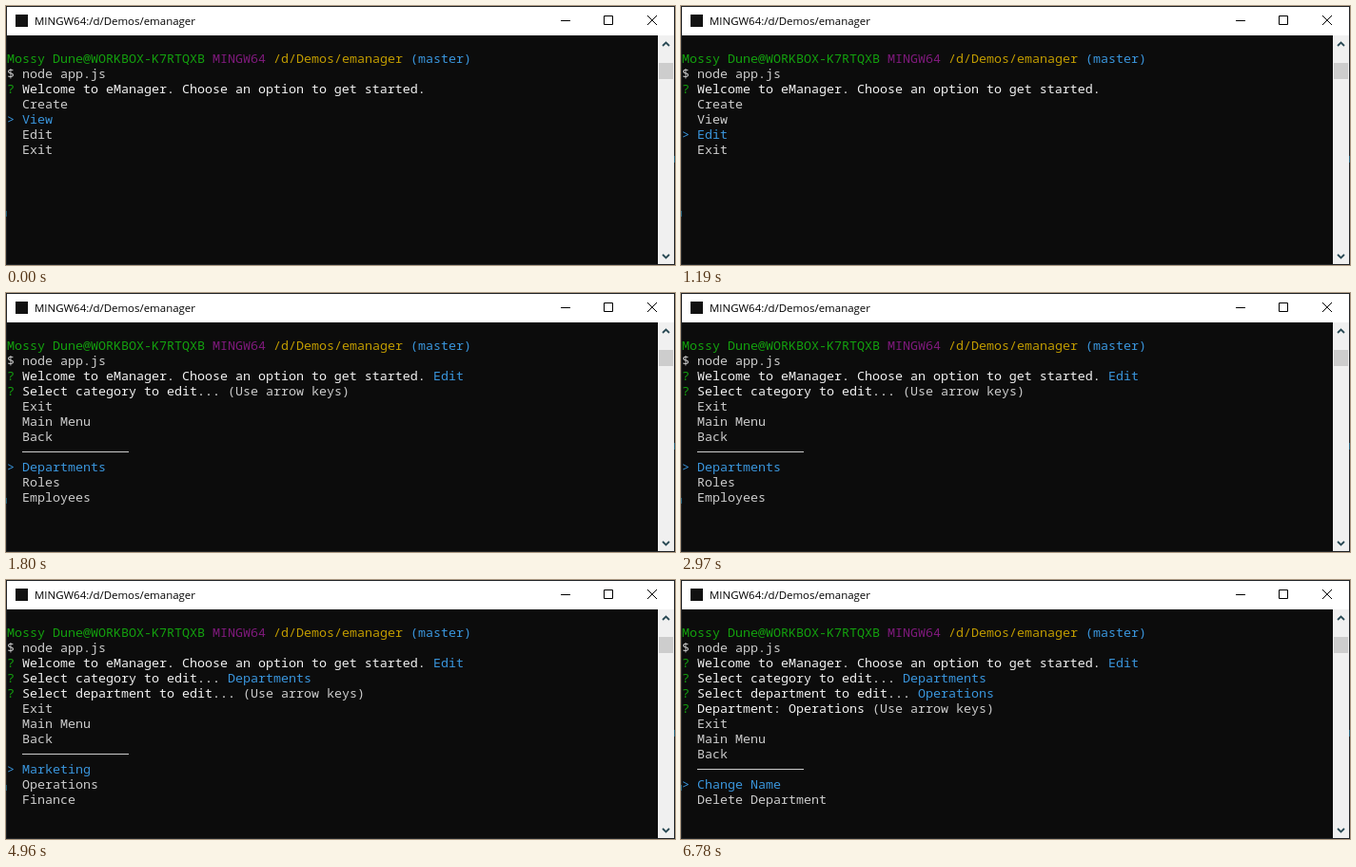
An HTML page for the animation above (8 s loop, 703 px wide and 273 px high).

```html
<!DOCTYPE html>
<html lang="en">
<head>
<meta charset="utf-8">
<title>Terminal menu</title>
<style>
  html, body { margin: 0; width: 100%; height: 100%; overflow: hidden; background: #0c0c0c; }
  svg { display: block; width: 703px; height: 273px; }
  .term text { font: 13.3333px "Noto Sans Mono", "DejaVu Sans Mono", monospace; white-space: pre; }
  .title { font: 11.46px "Open Sans", "Noto Sans", sans-serif; }
</style>
</head>
<body>
<svg viewBox="0 0 703 273" xmlns="http://www.w3.org/2000/svg">
  <rect width="703" height="273" fill="#202326"/>
  <rect x="1" y="1" width="701" height="30" fill="#fff"/>
  <rect x="1" y="31" width="684" height="241" fill="#0c0c0c"/>

  <rect x="10" y="9" width="13" height="13" fill="#111"/>
  <text class="title" x="30" y="20">MINGW64:/d/Demos/emanager</text>
  <g fill="none" stroke="#000">
    <path d="M583 15.5h10M628.5 10.5h9v9h-9z"/>
    <path d="M674 10l10 10M684 10l-10 10"/>
  </g>

  <rect x="685" y="31" width="17" height="241" fill="#f0f0f0"/>
  <rect x="686" y="60" width="15" height="17" fill="#cdcdcd"/>
  <path d="M690 42l3.5-3.5 3.5 3.5M690 262l3.5 3.5 3.5-3.5" fill="none" stroke="#2a4a55" stroke-width="1.8"/>

  <path d="M.5 216v6M702.5 158v7" stroke="#24627c"/>
  <g class="term" id="prompt"></g>
  <g class="term" id="screen"></g>
</svg>
<script>
const SVG = "http://www.w3.org/2000/svg";
const CELL = 8, LINE = 16, LEFT = 1, BASELINE = 60;
const LOOP = 8000;
const C = {
  green: "#13a10e", purple: "#7f1a7c", yellow: "#c19c00",
  blue: "#3a96dd", gray: "#cccccc", white: "#f2f2f2"
};

function add(parent, tag, attrs, content = "") {
  const el = document.createElementNS(SVG, tag);
  for (const key in attrs) el.setAttribute(key, attrs[key]);
  el.textContent = content;
  parent.appendChild(el);
}

// Writes [text, colour] pieces one after another on a terminal row.
function write(parent, row, ...pieces) {
  let column = 0;
  for (const [text, fill] of pieces) {
    add(parent, "text", { x: LEFT + column * CELL, y: BASELINE + row * LINE, fill }, text);
    column += text.length + 1;
  }
}

const WELCOME = "Welcome to eManager. Choose an option to get started.";
const CATEGORY = "Select category to edit...";
const DEPARTMENT = "Select department to edit...";
const HINT = "(Use arrow keys)";
const RULE = "-";

const answered = (question, answer) => [question, answer, C.blue];
const asking = (question, hint = "") => [question, hint, C.gray];

const main = ["Create", "View", "Edit", "Exit"];
const nav = ["Exit", "Main Menu", "Back", RULE];
const categories = [...nav, "Departments", "Roles", "Employees"];
const departments = [...nav, "Marketing", "Operations", "Finance"];
const actions = [...nav, "Change Name", "Delete Department"];

const editing = answered(WELCOME, "Edit");
const inDepartments = [editing, answered(CATEGORY, "Departments")];

const scenes = [
  { at: 0, questions: [asking(WELCOME)], menu: main, selected: "View" },
  { at: 400, questions: [asking(WELCOME)], menu: main, selected: "Edit" },
  { at: 1720, questions: [editing], menu: [], cursor: true },
  { at: 1800, questions: [editing, asking(CATEGORY, HINT)], menu: categories, selected: "Departments" },
  { at: 3750, questions: [...inDepartments, asking(DEPARTMENT, HINT)], menu: departments, selected: "Marketing" },
  { at: 5770, questions: [...inDepartments, asking(DEPARTMENT)], menu: departments, selected: "Operations" },
  { at: 6780,
    questions: [...inDepartments, answered(DEPARTMENT, "Operations"), asking("Department: Operations", HINT)],
    menu: actions, selected: "Change Name" }
];

const promptGroup = document.getElementById("prompt");
const screenGroup = document.getElementById("screen");

write(promptGroup, 0,
  ["Mossy Dune@WORKBOX-K7RTQXB", C.green], ["MINGW64", C.purple],
  ["/d/Demos/emanager", C.yellow], ["(master)", C.blue]);
write(promptGroup, 1, ["$ node app.js", C.gray]);

function draw({ questions, menu, selected, cursor }) {
  screenGroup.replaceChildren();
  let row = 2;
  for (const [question, tail, tailColor] of questions) {
    write(screenGroup, row++, ["?", C.green], [question, C.white], [tail, tailColor]);
  }
  for (const item of menu) {
    const active = item === selected;
    if (item === RULE) {
      add(screenGroup, "rect", {
        x: LEFT + 2 * CELL, y: BASELINE + row * LINE - 5,
        width: 14 * CELL, height: 1, fill: C.gray
      });
    } else {
      const color = active ? C.blue : C.gray;
      write(screenGroup, row, [active ? ">" : " ", color], [item, color]);
    }
    row++;
  }
  if (cursor) {
    add(screenGroup, "rect", {
      x: LEFT, y: BASELINE + row * LINE - 13, width: 1, height: LINE, fill: "#767676"
    });
  }
}

const start = performance.now();
let shown;

function tick() {
  const time = (performance.now() - start) % LOOP;
  const scene = scenes.findLast(s => s.at <= time);
  if (scene !== shown) draw(shown = scene);
  requestAnimationFrame(tick);
}
tick();
</script>
</body>
</html>
```
